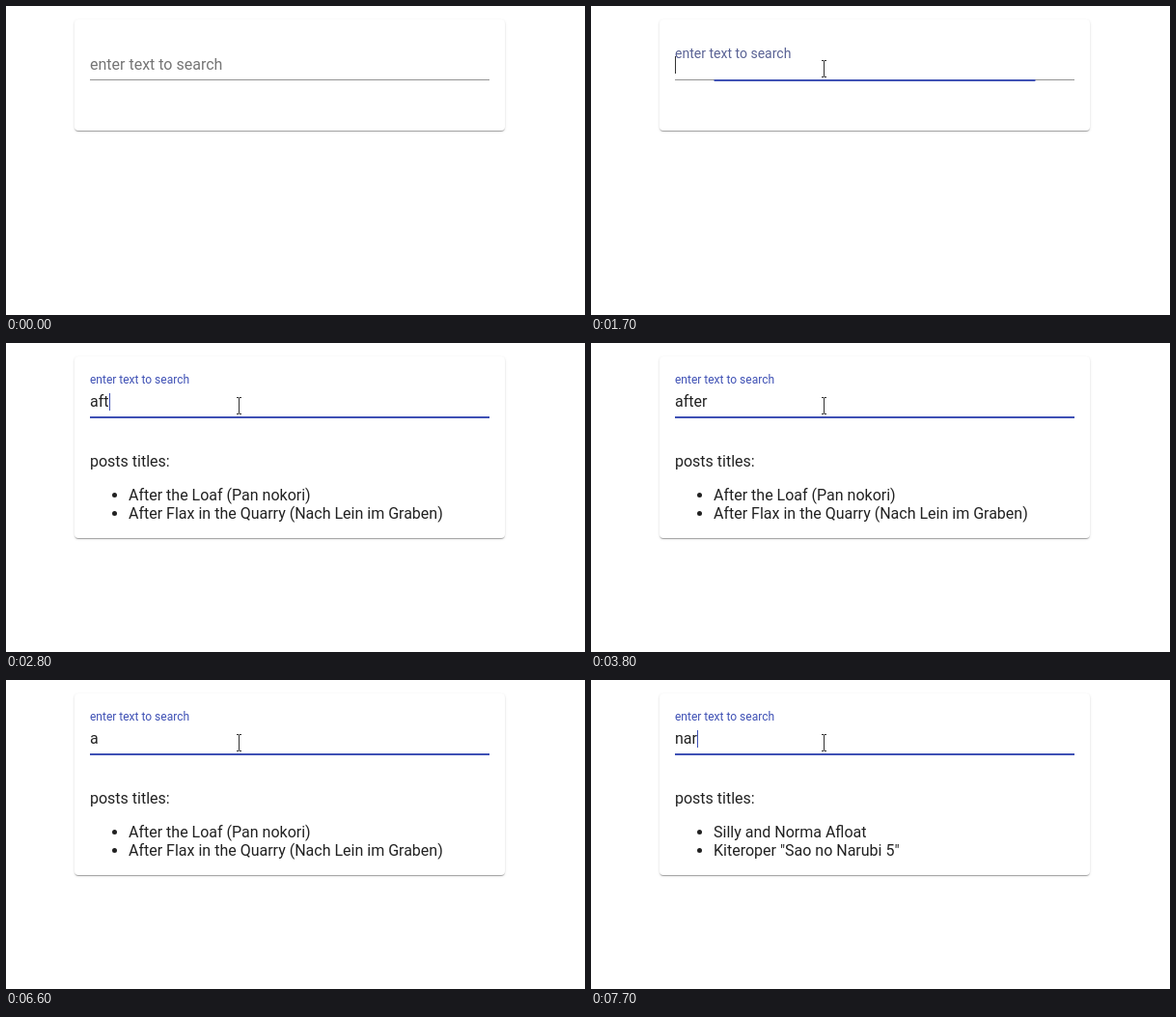
Recreate the animation shown at these times as an HTML page. Size 600x320 px, loop 8 s.

```html
<!DOCTYPE html>
<html lang="en">
<head>
<meta charset="utf-8">
<title>Search box</title>
<style>
  html, body { margin: 0; width: 100%; height: 100%; overflow: hidden; background: #fff; }
  body { position: relative; font: 16px/19px Roboto, sans-serif; color: rgba(0, 0, 0, .87); }
  body > * { position: absolute; white-space: pre; }
  #card {
    left: 71px; top: 14px; width: 446px; border-radius: 4px; background: #fff;
    box-shadow: 0 2px 1px -1px rgba(0,0,0,.2), 0 1px 1px rgba(0,0,0,.14), 0 1px 3px rgba(0,0,0,.12);
  }
  .field { left: 87px; top: 51px; }
  #label { transform-origin: 0 0; }
  #hint { color: rgba(0, 0, 0, .42); }
  #line, #ripple { left: 87px; top: 76px; width: 414px; height: 1px; background: #949494; }
  #ripple { height: 2px; background: #3f51b5; }
  #caret { top: 52px; width: 1px; height: 18px; }
  #results { left: 87px; top: 113px; }
  #results p { margin: 0 0 16px; }
  #results ul { margin: 0; padding-left: 40px; }
  #pointer { left: 0; top: 0; overflow: visible; }
</style>
</head>
<body>
<div id="card"></div>
<div id="label" class="field">enter text to search</div>
<div id="hint" class="field">enter text to search...</div>
<div id="line"></div>
<div id="ripple"></div>
<span id="typed" class="field"></span>
<div id="caret"></div>
<div id="results"><p>posts titles:</p><ul><li></li><li></li></ul></div>
<svg id="pointer" width="600" height="320">
  <g id="arrow">
    <path d="M.5 1V18L4 15.5 6 20 9.500 19 8 14.500 12 13Z" fill="#000" opacity=".14"/>
    <path d="M0 0V17.500L3.700 14.500 6 19.500 9 18.300 7 13 11.700 12.300Z" fill="#444" stroke="#fff" stroke-width=".6"/>
  </g>
  <g id="beam" fill="none">
    <path id="beamShape" d="M239 56.500H241L241.500 57 242 56.500H244M241.500 57V73M239 73.500H241L241.500 73 242 73.500H244" stroke="#333"/>
  </g>
</svg>
<script>
const LOOP = 8000, STEP = 100, FOCUS = 1640;
const el = id => document.getElementById(id);
const [card, label, hint, ripple, typed, caret, results, arrow, beam] =
  ['card', 'label', 'hint', 'ripple', 'typed', 'caret', 'results', 'arrow', 'beam'].map(el);
const items = results.querySelectorAll('li');

// [time, text, caret visible]
const typing = [
  [0, '', 0], [1700, '', 1],
  [2300, 'a', 1], [2400, 'af', 1], [2500, 'aft', 1], [2900, 'afte', 0], [3000, 'afte', 1],
  [3200, 'after', 1], [3800, 'after', 0], [4100, 'after ', 1], [4400, 'after the', 1],
  [5000, 'after the', 0], [5400, 'after th', 0], [5600, 'after t', 0], [5700, 'after', 1],
  [6100, 'afte', 0], [6200, 'aft', 0], [6400, 'af', 0], [6600, 'a', 0], [6700, '', 0], [6800, '', 1],
  [7200, 'n', 1], [7300, 'na', 1], [7400, 'nar', 1]
];

const after = ['After the Loaf (Pan nokori)', 'After Flax in the Quarry (Nach Lein im Graben)'];
const nar = ['Silly and Norma Afloat', 'Kiteroper "Sao no Narubi 5"'];
const listing = [[0, null], [2800, after], [4700, null], [6000, after], [7000, null], [7700, nar]];

// [time, x, y, shape]
const pointer = [
  [0, 0, 0, ''], [300, 516, 81, 'arrow'], [400, 0, 0, ''],
  [600, 423, 189, 'arrow'], [700, 322, 140, 'arrow'], [800, 255, 107, 'arrow'],
  [900, 249, 94, 'arrow'], [1000, 246, 84, 'arrow'],
  [1100, 3, 7, 'beam'], [1200, 1, 3, 'beam'], [1300, 0, 0, 'beam']
];

const current = (track, t) => track.findLast(entry => entry[0] <= t);
const clamp = v => Math.min(1, Math.max(0, v));
const ease = (t, delay, duration) => 1 - (1 - clamp((t - FOCUS - delay) / duration)) ** 4.2;
const mix = (a, b, k) => a + (b - a) * k;
const show = (node, on) => { node.style.display = on ? '' : 'none'; };

function drawField(t) {
  const k = ease(t, 0, 400);
  label.style.transform = `translateY(${-20.25 * k}px) scale(${1 - .25 * k})`;
  label.style.color = `rgb(${mix(117, 63, k)}, ${mix(117, 81, k)}, ${mix(117, 181, k)})`;
  ripple.style.transform = `scaleX(${mix(.5, 1, ease(t, 0, 300))})`;
  ripple.style.opacity = ease(t, 0, 100);

  const [, text, caretOn] = current(typing, t);
  typed.textContent = text;
  hint.style.opacity = text ? 0 : ease(t, 133, 400);
  show(caret, caretOn);
  caret.style.left = 87 + Math.round(typed.getBoundingClientRect().width) + 'px';
  caret.style.background = t < 2300 ? '#333' : '#3f51b5';
}

function drawResults(t) {
  const titles = current(listing, t)[1];
  show(results, titles);
  card.style.height = (titles ? 188 : 115) + 'px';
  if (titles) items.forEach((item, i) => { item.textContent = titles[i]; });
}

function drawPointer(t) {
  const [, x, y, shape] = current(pointer, t);
  for (const node of [arrow, beam]) {
    show(node, node.id === shape);
    node.setAttribute('transform', `translate(${x} ${y})`);
  }
}

const start = performance.now();
function frame() {
  const elapsed = (performance.now() - start) % LOOP;
  const t = Math.floor(elapsed / STEP) * STEP;
  drawField(t);
  drawResults(t);
  drawPointer(t);
  requestAnimationFrame(frame);
}
frame();
</script>
</body>
</html>
```
